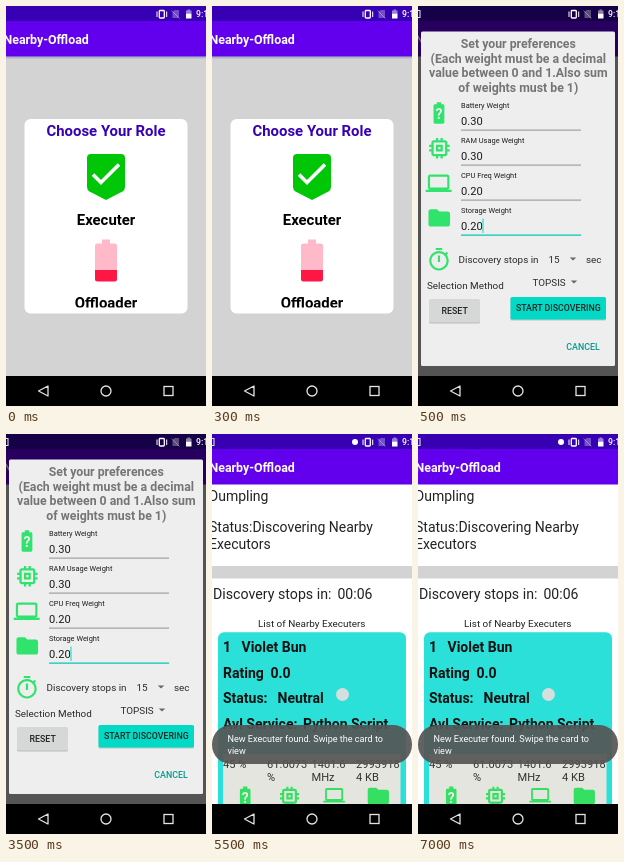
Recreate the animation shown at these times as an HTML page. Size 200 by 400 pixels, loop 8 s.

```html
<!DOCTYPE html>
<html lang="en">
<head>
<meta charset="utf-8">
<title>Nearby-Offload</title>
<style>
  html, body { margin: 0; width: 100%; height: 100%; overflow: hidden; background: #000; }
  svg { display: block; width: 100%; height: 100%; font-family: Roboto, sans-serif; }
  .screen { display: none; }
  .screen.on { display: inline; }
  .mid { text-anchor: middle; }
  .b { font-weight: 700; }
  .med { font-weight: 500; }
</style>
</head>
<body>
<svg viewBox="0 0 200 400">
  <defs>
    <g id="battery">
      <path d="M15.67 4H14V2h-4v2H8.33C7.6 4 7 4.6 7 5.33v15.33C7 21.4 7.6 22 8.33 22h7.33c.74 0 1.34-.6 1.34-1.33V5.33C17 4.6 16.4 4 15.67 4z"/>
      <text class="mid b" x="12" y="17.8" font-size="13" fill="#eee">?</text>
    </g>
    <path id="chip" d="M15 9H9v6h6V9zm-2 4h-2v-2h2v2zm8-2V9h-2V7c0-1.1-.9-2-2-2h-2V3h-2v2h-2V3H9v2H7c-1.1 0-2 .9-2 2v2H3v2h2v2H3v2h2v2c0 1.1.9 2 2 2h2v2h2v-2h2v2h2v-2h2c1.1 0 2-.9 2-2v-2h2v-2h-2v-2h2zm-4 6H7V7h10v10z"/>
    <path id="laptop" d="M20 18c1.1 0 2-.9 2-2V6c0-1.1-.9-2-2-2H4c-1.1 0-2 .9-2 2v10c0 1.1.9 2 2 2H0v2h24v-2h-4zM4 6h16v10H4V6z"/>
    <path id="folder" d="M10 4H4c-1.1 0-2 .9-2 2v12c0 1.1.9 2 2 2h16c1.1 0 2-.9 2-2V8c0-1.1-.9-2-2-2h-8l-2-2z"/>
    <path id="timer" d="M15 1H9v2h6V1zm-4 13h2V8h-2v6zm8.03-6.61l1.42-1.42c-.43-.51-.9-.99-1.41-1.41l-1.42 1.42C16.07 4.74 14.12 4 12 4c-4.97 0-9 4.03-9 9s4.02 9 9 9 9-4.03 9-9c0-2.12-.74-4.07-1.97-5.61zM12 20c-3.87 0-7-3.13-7-7s3.13-7 7-7 7 3.13 7 7-3.13 7-7 7z"/>
    <path id="arrow" d="M-3.2-1.6h6.4L0 1.6z" fill="#666"/>
    <path id="notice" d="M-4 4.500h6v7h-6" fill="none" stroke="#ddd" stroke-width="1.100"/>
    <g id="bars">
      <rect width="200" height="50.500" fill="#6200ee"/>
      <rect width="200" height="15" fill="#3700b3"/>
      <text class="b" x="-2.500" y="38" font-size="12.400" fill="#fff">Nearby-Offload</text>
    </g>
    <linearGradient id="shade" x2="0" y2="1">
      <stop stop-color="#3a4ab0" stop-opacity=".35"/>
      <stop offset="1" stop-color="#3a4ab0" stop-opacity="0"/>
    </linearGradient>
    <clipPath id="cardClip"><rect x="18" y="113" width="164" height="188.500"/></clipPath>
  </defs>

  <g class="screen">
    <rect width="200" height="370" fill="#d3d3d3"/>
    <use href="#bars"/>
    <rect y="50.500" width="200" height="3" fill="url(#shade)"/>
    <rect x="18.500" y="113" width="163" height="194.500" rx="6" fill="#fff"/>
    <g class="mid b" font-size="14.900" clip-path="url(#cardClip)">
      <text x="100" y="129.700" fill="#3700b3">Choose Your Role</text>
      <text x="100" y="218.500">Executer</text>
      <text x="100" y="301.500">Offloader</text>
    </g>
    <path d="M85 148h30q4 0 4 4v29q0 3-2.500 4.600L100 194l-16.500-8.400Q81 184 81 181v-29q0-4 4-4z" fill="#00c608"/>
    <path d="M87 168.500l8 8 18-18" fill="none" stroke="#fff" stroke-width="3.600"/>
    <path d="M96 233.500h8v4h4.500q2.500 0 2.500 2.500v24.500H89V240q0-2.500 2.500-2.500H96z" fill="#ffb9c9"/>
    <path d="M89 264h22v9q0 2.500-2.500 2.500h-17q-2.500 0-2.500-2.500z" fill="#ff1744"/>
  </g>

  <g class="screen">
    <rect width="200" height="370" fill="#d3d3d3"/>
    <use href="#bars"/>
    <rect width="200" height="370" opacity=".6"/>
    <use href="#notice"/>
    <rect x="3" y="25.500" width="194" height="334.500" rx="1.500" fill="#eee"/>
    <g class="mid b" font-size="12.300" fill="#757575">
      <text x="100.300" y="42">Set your preferences</text>
      <text x="100.300" y="56.500">(Each weight must be a decimal</text>
      <text x="100.300" y="71">value between 0 and 1.Also sum</text>
      <text x="100.300" y="85.500">of weights must be 1)</text>
    </g>
    <g id="fields" fill="#1c1c1c"></g>
    <path d="M65 212.500v14.500" stroke="#03dac5"/>
    <g fill="#2fe36c">
      <use href="#battery" transform="translate(8 94) scale(1.08)"/>
      <use href="#chip" transform="translate(7.700 128.500) scale(1.14)"/>
      <use href="#laptop" transform="translate(7.700 164.300) scale(1.08)"/>
      <use href="#folder" transform="translate(8.300 199) scale(1.08)"/>
      <use href="#timer" transform="translate(8 240.800) scale(1.08)"/>
    </g>
    <g font-size="9.900" fill="#2a2a2a">
      <text x="40.500" y="257">Discovery stops in</text>
      <text x="130.500" y="257">15</text>
      <text x="168" y="257">sec</text>
      <text x="9" y="282.500">Selection Method</text>
      <text x="114.500" y="279.500">TOPSIS</text>
    </g>
    <use href="#arrow" x="155" y="253"/>
    <use href="#arrow" x="156" y="276"/>
    <rect x="11" y="294" width="51" height="23.500" rx="1.500" fill="#bbb"/>
    <rect x="11" y="293" width="51" height="23.500" rx="1.500" fill="#d6d7d7"/>
    <rect x="92.500" y="292" width="95.500" height="22.500" rx="1.500" fill="#b5c9c7"/>
    <rect x="92.500" y="291" width="95.500" height="22.500" rx="1.500" fill="#03dac5"/>
    <g class="mid med" font-size="8.800" fill="#222">
      <text x="36.700" y="307.500">RESET</text>
      <text x="140.300" y="305.300">START DISCOVERING</text>
      <text x="165" y="343.500" fill="#03998c">CANCEL</text>
    </g>
  </g>

  <g class="screen">
    <rect width="200" height="370" fill="#fff"/>
    <rect y="132" width="200" height="12.500" fill="#d3d3d3"/>
    <use href="#bars"/>
    <use href="#notice"/>
    <g font-size="14" fill="#222">
      <text x="-3" y="67">Dumpling</text>
      <text x="-3" y="98.300">Status:Discovering Nearby</text>
      <text x="-3" y="115.300">Executors</text>
      <text x="1" y="165" font-size="14.200">Discovery stops in:</text>
      <text x="125.500" y="165">00:06</text>
      <text x="46" y="193" font-size="9.950">List of Nearby Executers</text>
    </g>
    <rect x="6" y="198.300" width="188" height="190" rx="6" fill="#2ae0d8"/>
    <g class="b" font-size="14" fill="#111">
      <text x="11" y="218">1</text>
      <text x="29.500" y="218">Violet Bun</text>
      <text x="11" y="243.500">Rating</text>
      <text x="58.500" y="243.500">0.0</text>
      <text x="11" y="269">Status:</text>
      <text x="65.500" y="269">Neutral</text>
      <text x="11" y="295">Avl Service:</text>
      <text x="91" y="295">Python Script</text>
    </g>
    <circle cx="130.500" cy="260.500" r="6.500" fill="#d5dfdd"/>
    <rect x="11" y="320" width="177.500" height="50" fill="#e4e5df"/>
    <g font-size="11.100" fill="#333">
      <text x="11" y="333.500">45 %</text>
      <text x="55" y="333.500">61.0073</text>
      <text x="55" y="346.500">%</text>
      <text x="99.500" y="333.500">1401.6</text>
      <text x="99.500" y="346.500">MHz</text>
      <text x="144" y="333.500">2993918</text>
      <text x="144" y="346.500">4 KB</text>
    </g>
    <g fill="#35df62">
      <use href="#battery" transform="translate(20.500 350.500) scale(1.06)"/>
      <use href="#chip" transform="translate(64.800 349.500) scale(1.06)"/>
      <use href="#laptop" transform="translate(111.300 350.500) scale(.9)"/>
      <use href="#folder" transform="translate(153.600 349.500) scale(1.06)"/>
    </g>
    <rect y="291" width="200" height="39" rx="19" fill="#555" opacity=".92"/>
    <g font-size="9.080" fill="#fff">
      <text x="15.500" y="308">New Executer found. Swipe the card to</text>
      <text x="15.500" y="320">view</text>
    </g>
    <circle cx="143" cy="8" r="3" fill="#fff"/>
  </g>

  <g fill="#fff">
    <rect x="153.300" y="4.500" width="5" height="7.500" rx=".8" fill="none" stroke="#fff" stroke-width="1.300"/>
    <path d="M151 5.500v5.500M160.700 5.500v5.500" stroke="#fff"/>
    <path d="M166.500 6l2-2h4.500v8h-6.500z" opacity=".3"/>
    <path d="M165.500 4.500l8 8" stroke="#fff" opacity=".35"/>
    <path d="M181.500 3.500h2.500v1h1.500v3h-5.500v-3h1.500z" opacity=".5"/>
    <path d="M180 7.500h5.500v5h-5.500z"/>
    <text class="med" x="190" y="11.300" font-size="8.700">9:15</text>
  </g>
  <rect y="370" width="200" height="30"/>
  <g fill="none" stroke="#e4e4e4" stroke-width="1.300">
    <path d="M42 380v10l-9.500-5z" stroke-linejoin="round"/>
    <circle cx="100" cy="385" r="5"/>
    <rect x="158" y="380.500" width="9" height="9"/>
  </g>
</svg>
<script>
  const fields = [["Battery", "0.30"], ["RAM Usage", "0.30"], ["CPU Freq", "0.20"], ["Storage", "0.20"]];
  document.getElementById("fields").innerHTML = fields.map(([name, value], i) => {
    const y = 101.5 + i * 35;
    const line = i === 3 ? ["#03c9b6", 1.3] : ["#777", 0.8];
    return `<text x="43" y="${y}" font-size="7.45">${name} Weight</text>
      <text x="43" y="${y + 17.7}" font-size="11.1">${value}</text>
      <path d="M43 ${y + 22.6}h120" stroke="${line[0]}" stroke-width="${line[1]}"/>`;
  }).join("");

  const LOOP = 8000;
  const starts = [0, 500, 5500];
  const screens = document.querySelectorAll(".screen");

  function draw() {
    const time = performance.now() % LOOP;
    const current = starts.filter(start => start <= time).length - 1;
    screens.forEach((screen, i) => screen.classList.toggle("on", i === current));
    requestAnimationFrame(draw);
  }
  draw();
</script>
</body>
</html>
```
